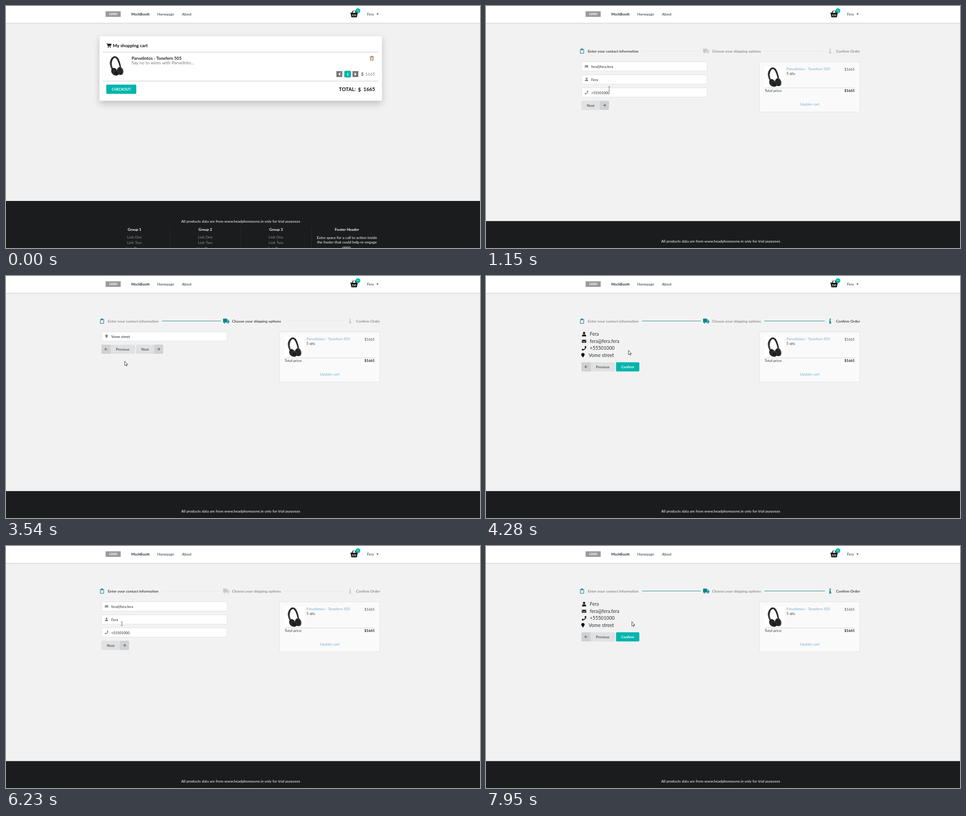
Recreate the animation shown at these times as an HTML page with a canvas. Size 1048 by 535 pixels, loop 8 s.

```html
<!DOCTYPE html>
<html lang="en">
<head>
<meta charset="utf-8">
<title>Checkout</title>
<style>
html, body { margin: 0; width: 100%; height: 100%; overflow: hidden; background: #f1f1f1; }
canvas { display: block; }
</style>
</head>
<body>
<canvas id="stage" width="1048" height="535"></canvas>
<script>
const ctx = document.getElementById('stage').getContext('2d');
const LOOP = 8000, TEAL = '#00b5ad', DEEP = '#00828a', PRESS = 90;
const USER = 'Fera', MAIL = 'fera@fera.fera', PHONE = '+55501000', STREET = 'Vome street';
const ITEM = 'Parvelintos - Tonefern 505';

// Icons on a 16 unit grid, filled even-odd
const ICONS = {
  mail: 'M0 4.5Q0 3 1.5 3h13Q16 3 16 4.5L8 10zM0 6.3 8 11.7 16 6.3V12Q16 13.5 14.5 13.5h-13Q0 13.5 0 12z',
  user: 'M8 8a4 4 0 1 1 .01 0zM1 15.5v-2Q1 9.3 5 9.3h6q4 0 4 4.2v2q0 .5-.5.5h-13q-.5 0-.5-.5z',
  phone: 'M15.4.8 12.2 0q-.6-.1-.8.4l-1.5 3.5q-.2.5.2.9l1.9 1.5A11.6 11.6 0 0 1 6.4 11.9L4.8 10q-.4-.4-.9-.2L.4 11.3q-.5.3-.4.9l.8 3.2q.1.6.8.6A14.4 14.4 0 0 0 16 1.6q0-.6-.6-.8z',
  pin: 'M8 16Q2 8.5 2 6a6 6 0 0 1 12 0Q14 8.5 8 16z',
  cart: 'M0 1h3l.6 2H16l-1.5 6.5H5.3l.3 1.5H14v1.5H4.3L2.2 2.5H0zM5.5 13a1.5 1.5 0 1 1-.01 0zM12.5 13a1.5 1.5 0 1 1-.01 0z',
  basket: 'M0 6h16v1.6h-.8L14 14.6q-.2 1-1.2 1H3.2q-1 0-1.2-1L.8 7.6H0zM2.7 6 6 .8 7.3 1.6 4.6 6zM13.3 6 10 .8 8.7 1.6 11.4 6zM4.3 9h1.2v4.5H4.3zM7.4 9h1.2v4.5H7.4zM10.5 9h1.2v4.5h-1.2z',
  truck: 'M.8 2h8.4q.8 0 .8.8v9H0V2.8Q0 2 .8 2zM10.7 4.5H13l2.5 2.8v4.5h-4.8zM11.8 5.6v2h2.6l-1.7-2zM3.5 10.6a1.9 1.9 0 1 1-.01 0zM12.3 10.6a1.9 1.9 0 1 1-.01 0z',
  info: 'M6 0h4v4H6zM4.5 6H10v7.5h1.5V16h-7v-2.5H6v-5H4.5z',
  clipboard: 'M3 2h2.5a2.5 2.5 0 0 1 5 0H13q1 0 1 1v12q0 1-1 1H3q-1 0-1-1V3q0-1 1-1zM3.6 3.6v10.8h8.8V3.6H11v1.9H5V3.6z',
  trash: 'M5.5 0h5l1 1.8H15v1.6H1V1.8h3.5zM2 4h12l-.8 12H2.8zM3.6 5.5l.7 9h7.4l.7-9zM5.5 6.5h1.2v7H5.5zM9.3 6.5h1.2v7H9.3z',
  right: 'M1 7h9.5l-4-4L8 1.5 14.5 8 8 14.5 6.5 13l4-4H1z',
  left: 'M15 7H5.5l4-4L8 1.5 1.5 8 8 14.5 9.5 13l-4-4H15z'
};
for (const name in ICONS) ICONS[name] = new Path2D(ICONS[name]);
const ARROW = new Path2D('M0 0v9.5l2.2-2 1.6 3.3 1.4-.7-1.5-3.1h3z');
const HAND = new Path2D('M-1.2 1q0-1 1.1-1T1 1v4l3.6.8q1.2.3 1.2 1.5 0 3-1.2 5.2h-5Q-2.5 10-4.2 7.5q.8-1.2 2-.2l1 .8z');
const BEAM = new Path2D('M-2-4.5Q0-4.5 0-3.7Q0-4.5 2-4.5M0-3.7V3.7M-2 4.5Q0 4.5 0 3.7Q0 4.5 2 4.5');

// [time, page]; page 0 is the cart, 1 to 3 are the checkout steps
const PAGES = [[0, 0], [1060, 1], [3070, 2], [4240, 3], [5060, 2], [5900, 1], [6750, 2], [7680, 3]];
// [time, x, y] of the pointer
const ROUTE = [
  [160, 995, 530], [910, 273, 182], [1090, 273, 182], [1740, 248, 214], [1790, 248, 214],
  [1880, 245, 212.5], [3070, 245, 213], [3330, 251, 254], [3540, 262.5, 188.5], [3770, 305, 163],
  [3820, 305, 163], [3970, 312, 165], [4240, 313, 165], [4280, 315, 164.5], [4500, 300, 243],
  [4720, 265, 225], [4940, 258, 199], [5060, 258, 199], [5370, 252, 219], [5760, 250, 163],
  [5900, 250, 163], [6230, 256, 172], [6610, 240, 217], [6750, 240, 217], [7260, 313, 167],
  [7410, 313, 167], [7440, 311.5, 166.5], [7680, 312, 166.5], [7950, 322.5, 167.5]
];

let px, py, pressed, shape;

function text(s, x, y, size, color, weight = 400, align = 'left', face = 'Lato') {
  ctx.font = `${weight} ${size}px "${face}", sans-serif`;
  ctx.fillStyle = color;
  ctx.textAlign = align;
  ctx.fillText(s, x, y + size * 0.36);
}
function rect(x, y, w, h, color) {
  ctx.fillStyle = color;
  ctx.fillRect(x, y, w, h);
}
function round(x, y, w, h, r, fill, border) {
  ctx.beginPath();
  ctx.roundRect(x, y, w, h, r);
  ctx.fillStyle = fill;
  ctx.fill();
  if (border) {
    ctx.strokeStyle = border;
    ctx.lineWidth = 0.8;
    ctx.stroke();
  }
}
function ellipse(x, y, rx, ry, turn, color) {
  ctx.beginPath();
  ctx.ellipse(x, y, rx, ry, turn, 0, 7);
  ctx.fillStyle = color;
  ctx.fill();
}
function icon(name, cx, cy, size, color) {
  ctx.save();
  ctx.translate(cx - size / 2, cy - size / 2);
  ctx.scale(size / 16, size / 16);
  ctx.fillStyle = color;
  ctx.fill(ICONS[name], 'evenodd');
  ctx.restore();
}
const over = (x, y, w, h) => px >= x && px < x + w && py >= y && py < y + h;

function shade(x, y, w, h, plain, hover, active) {
  if (!over(x, y, w, h)) return plain;
  shape = 'hand';
  return pressed ? active : hover;
}

function headphones(x, y) {
  ctx.save();
  ctx.translate(x, y);
  const fill = (color, d) => {
    ctx.fillStyle = color;
    ctx.fill(new Path2D(d));
  };
  fill('#2b2c2e', 'M.5 15Q2 5 9 1.2Q14 0 18 4Q23 11 25.5 25L22.5 26Q19 11 14.5 6Q11 3 8 7Q5 11 5 16z');
  fill('#3c3d3f', 'M.5 14L5 15Q4.5 22 8 29L5 31Q0 22 .5 14z');
  ellipse(24.5, 33.5, 6, 9, -0.25, '#48494c');
  ellipse(22.5, 34, 6, 8.5, -0.25, '#252628');
  ellipse(10.5, 35, 6.5, 8.5, -0.45, '#222325');
  ellipse(14, 37.5, 7.5, 6.3, 0.3, '#303133');
  ellipse(14.5, 38, 5, 4, 0.3, '#1b1c1d');
  ctx.restore();
}

function header() {
  rect(0, 38, 1048, 1.5, '#e2e2e2');
  rect(0, 0, 1048, 37.5, '#fff');
  rect(0, 37.3, 1048, 0.7, '#d8d8d9');
  rect(220.3, 11.7, 33.3, 12.4, '#9a9a9a');
  text('LOGO', 237, 18, 6.3, '#fff', 700, 'center', 'Open Sans');
  text('MockBooth', 277, 18, 7.78, '#1c3137', 700);
  text('Homepage', 334.5, 18, 7.78, '#1c3137');
  text('About', 389.3, 18, 7.78, '#1c3137');
  icon('basket', 769.7, 17, 16.8, '#111');
  ellipse(778.2, 10.2, 5.2, 5.2, 0, TEAL);
  text('5', 778.2, 10.2, 5.5, '#fff', 400, 'center');
  text(USER, 798.3, 18, 7.78, '#1c3137');
  ctx.fillStyle = '#222';
  ctx.fill(new Path2D('M819 16.7h4.8l-2.4 2.6z'));
}

function footer(top) {
  ctx.save();
  ctx.translate(0, top);
  rect(0, 0, 1048, 120, '#1b1c1d');
  text('All products data are from www.headphonezone.in only for trial purposes', 519, 45, 8.2, '#fff', 400, 'center');
  [362, 518.7, 675].forEach(x => rect(x, 57, 0.8, 60, '#2d2e2f'));
  [284, 440.5, 597].forEach((x, i) => {
    text('Group ' + (i + 1), x, 63, 8.33, '#fff', 700, 'center');
    ['One', 'Two', 'Three'].forEach((n, j) =>
      text('Link ' + n, x, 80.3 + j * 12.2, 8.27, '#8d8e8e', 400, 'center'));
  });
  text('Footer Header', 753.8, 63, 8.3, '#fff', 700, 'center');
  ['Extra space for a call to action inside', 'the footer that could help re-engage', 'users.'].forEach((s, i) =>
    text(s, 753.8, 80.5 + i * 10.7, 8.35, '#fff', 400, 'center'));
  ctx.restore();
}

function cartPage() {
  ctx.save();
  ctx.shadowColor = 'rgba(0,0,0,.2)';
  ctx.shadowBlur = 15;
  ctx.shadowOffsetY = 7;
  round(206.5, 66, 625, 143.5, 2, '#fff');
  ctx.restore();
  round(206.5, 66, 625, 143.5, 2, '#fff', '#e0e0e1');
  icon('cart', 227.7, 87, 11, '#111');
  text('My shopping cart', 235.9, 87.5, 10, '#111', 700);
  rect(214, 101.4, 610, 1.2, '#d0d0d1');
  rect(214, 165.4, 610, 1.2, '#d0d0d1');
  headphones(229, 110);
  text(ITEM, 277.7, 115.5, 9.4, '#262626', 700);
  text('Say no to wires with Parvelinto...', 277.7, 126, 9.7, '#7c7c7c');
  icon('trash', 808.7, 115.5, 10.5, '#a5673f');
  rect(730.5, 144, 13, 13, '#757575');
  rect(766, 144, 13, 13, '#757575');
  ctx.fillStyle = '#fff';
  ctx.fill(new Path2D('M739 146.5v8l-4-4zM770.7 146.5v8l4-4z'));
  round(748, 143.3, 14.7, 14.7, 2, TEAL);
  text('5', 755.4, 151.2, 7.5, '#fff', 700, 'center');
  text('$', 788, 150, 10, '#666', 700, 'center');
  text('1665', 816, 150.5, 9.3, '#858585', 400, 'right');
  const fill = shade(222, 174, 66, 20, TEAL, '#009c95', '#00857f');
  if (over(233, 178, 43, 12)) shape = 'beam';
  round(221.7, 173.8, 66.4, 20.4, 2, fill);
  text('CHECKOUT', 255, 184, 7.78, '#fff', 700, 'center');
  text('TOTAL:', 736, 184.5, 11.1, '#111', 700);
  text('$', 781.7, 184.5, 11.5, '#111', 700, 'center');
  text('1665', 816, 184.5, 11.1, '#111', 700, 'right');
}

function button(label, x, y, w, arrow) {
  const h = 20.3, fill = shade(x, y, w, h, '#e0e1e2', '#cacbcd', '#babbbc');
  const ink = fill === '#e0e1e2' ? '#5a5a5b' : '#2c2d2e';
  const left = arrow === 'left', ix = left ? x : x + w - 20;
  round(x, y, w, h, 2, fill);
  round(ix, y, 20, h, left ? [2, 0, 0, 2] : [0, 2, 2, 0], 'rgba(0,0,0,.07)');
  icon(arrow, ix + 10, y + 10, 8, ink);
  text(label, left ? x + 47 : x + (w - 20) / 2, y + 10.2, 7.78, ink, 700, 'center');
}

function input(name, value, y) {
  if (over(211, y, 278, 20.5)) shape = 'beam';
  round(211.4, y, 277.5, 20.5, 2, '#fff', '#dcdcdd');
  icon(name, 222.3, y + 10, 7.8, '#858585');
  text(value, 232.8, y + 10.8, 7.78, '#222');
}

function steps(page) {
  const label = (s, x, n) => text(s, x, 100, 8.2, n === page ? '#484848' : '#8f8f8f', 700);
  const tint = n => page >= n ? DEEP : '#c9c9c9';
  const line = (x, w, done) => rect(x, 99, w, 1, done ? '#25888c' : '#e6e6e6');
  icon('clipboard', 212.3, 99.5, 11.5, '#1f86a3');
  label('Enter your contact information', 225, 1);
  line(345, 130, page > 1);
  icon('truck', 487, 99.5, 14, tint(2));
  label('Choose your shipping options', 499.7, 2);
  line(615.5, 133.5, page > 2);
  icon('info', 761, 99.5, 11, tint(3));
  label('Confirm Order', 774, 3);
}

function summary() {
  const blue = '#74abd5';
  round(604.5, 123.4, 222, 111, 2, '#fafafa', '#dcdcdd');
  rect(616, 134, 44, 46, '#fff');
  headphones(622.5, 134.8);
  text(ITEM, 664.3, 139.5, 8.3, blue);
  text('5 qty.', 664.3, 149, 8.27, '#3c3c3c');
  text('$1665', 815, 140, 7.78, '#4a4a4a', 400, 'right');
  rect(616, 180.6, 199, 0.9, '#cfcfcf');
  text('Total price:', 616, 187.5, 8.15, '#3c3c3c');
  text('$1665', 815, 187.5, 7.78, '#222', 700, 'right');
  text('Update cart', 715.7, 217, 8.3, blue, 400, 'center');
}

function checkoutPage(page) {
  steps(page);
  summary();
  if (page === 1) {
    input('mail', MAIL, 123.4);
    input('user', USER, 152.2);
    input('phone', PHONE, 181);
    button('Next', 211, 209.5, 61, 'right');
  } else if (page === 2) {
    input('pin', STREET, 123.4);
    button('Previous', 211, 151.7, 74.3, 'left');
    button('Next', 287.5, 151.7, 60, 'right');
  } else {
    [['user', USER, 229.5], ['mail', MAIL, 229.5], ['phone', PHONE, 229.5], ['pin', STREET, 227]].forEach(([name, s, x], i) => {
      const y = 128.5 + i * 15.6;
      icon(name, x - 12.7, y, 10, '#111');
      text(s, x, y, 10.5, '#333');
    });
    button('Previous', 211, 190.7, 74.3, 'left');
    const box = [287.5, 190.7, 51.5, 20.3];
    round(...box, 2, shade(...box, TEAL, '#009c95', '#00857f'));
    text('Confirm', 313.2, 200.9, 7.78, '#fff', 700, 'center');
  }
}

function locate(t) {
  const i = ROUTE.findIndex(p => p[0] > t);
  const b = ROUTE[i < 0 ? ROUTE.length - 1 : i];
  const a = i > 0 ? ROUTE[i - 1] : b;
  const k = a === b ? 0 : (t - a[0]) / (b[0] - a[0]);
  const e = k * k * (3 - 2 * k);
  px = a[1] + (b[1] - a[1]) * e;
  py = a[2] + (b[2] - a[2]) * e;
}

function pointer() {
  ctx.save();
  ctx.translate(px, py);
  ctx.lineJoin = 'round';
  ctx.lineWidth = 0.85;
  ctx.strokeStyle = '#222';
  ctx.fillStyle = '#fff';
  if (shape === 'beam') {
    ctx.strokeStyle = '#555';
    ctx.stroke(BEAM);
  } else {
    const path = shape === 'hand' ? HAND : ARROW;
    ctx.fill(path);
    ctx.stroke(path);
  }
  ctx.restore();
}

function draw(t) {
  const page = PAGES.filter(p => p[0] <= t).pop()[1];
  pressed = PAGES.some(p => p[0] > t && p[0] - t <= PRESS);
  shape = 'arrow';
  locate(t);
  rect(0, 0, 1048, 535, page ? '#f2f2f2' : '#f1f1f1');
  header();
  footer(page ? 475.5 : 431);
  if (page) checkoutPage(page);
  else cartPage();
  if (t >= 160) pointer();
}

const start = performance.now();
function tick() {
  draw((performance.now() - start) % LOOP);
  requestAnimationFrame(tick);
}
tick();
</script>
</body>
</html>
```
